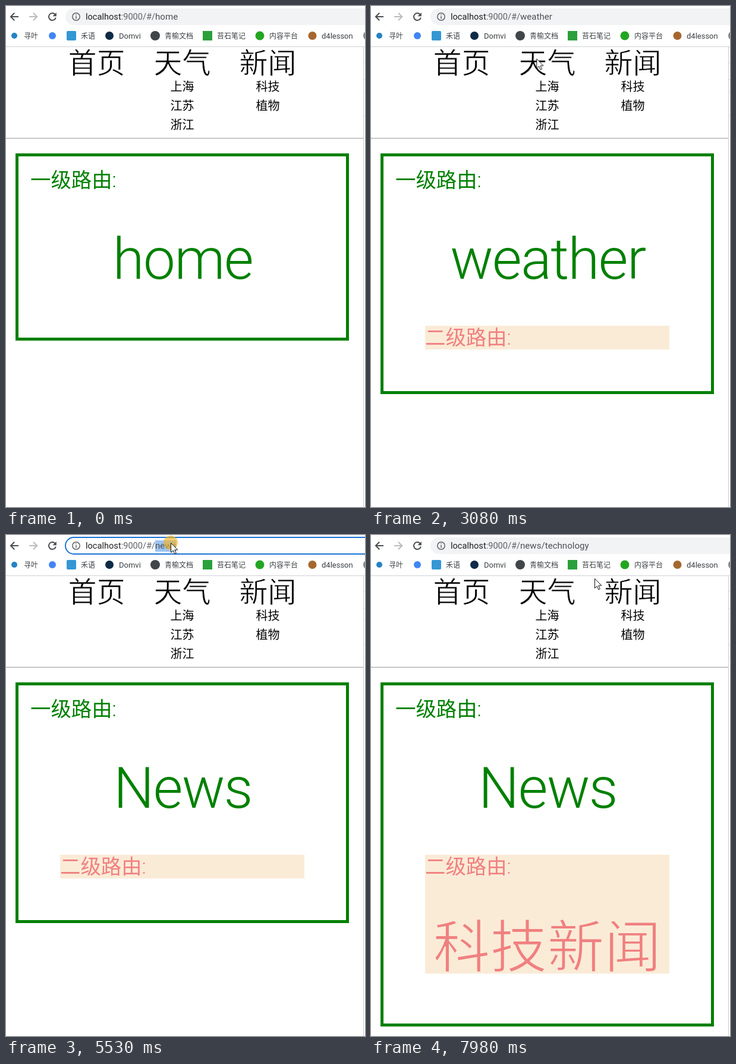
Animation, 604 px wide and 843 px high, one loop 8000 ms. Source, as an HTML page:

```html
<!DOCTYPE html>
<html lang="zh-CN">
<head>
<meta charset="utf-8">
<title>Router demo</title>
<style>
  html, body { margin: 0; height: 100%; overflow: hidden; background: #fff; }
  svg { display: block; width: 100vw; height: 100vh; }
  text { font-family: Roboto, "Noto Sans CJK SC", "Noto Sans CJK", sans-serif; }
  .mid { text-anchor: middle; }
  /* a stroke in the backdrop colour thins the heavy CJK glyphs */
  .nav { font-size: 48px; stroke: #fff; stroke-width: .8px; }
  .sub { font-size: 20px; }
  .label { font-size: 34.4px; font-weight: 300; }
  .big { font-size: 96px; font-weight: 300; }
  .latinBig { letter-spacing: -1.5px; }
  .thin { stroke: #faebd7; stroke-width: 2px; }
  .green { fill: #008000; }
  .coral { fill: #f08080; }
  .mark { font-size: 12px; fill: #3c4043; }
  .latin { font-size: 13px; }
  .host { font-size: 14.6px; fill: #202124; }
  .grey { fill: #5f6368; }
  .path { font-size: 15.1px; fill: #4d5156; }
  .icon { fill: none; stroke: #4a4e52; stroke-width: 2; }
  .off { stroke: #b9bcbf; }

  .home, .weather, .news, .newsUrl, .tech, .second, .frame, .band,
  .focus, .pick, .press, .arrow, .beam {
    animation: 8s step-end infinite;
  }
  .home { animation-name: home; }
  .weather { animation-name: weather; }
  .news { animation-name: news; }
  .newsUrl { animation-name: newsUrl; }
  .tech { animation-name: tech; }
  .second { animation-name: second; }
  .frame { animation-name: frame; }
  .band { animation-name: band; }
  .focus { animation-name: focus; }
  .pick { animation-name: pick; }
  .press { animation-name: press; }
  .arrow { animation-name: arrow; }
  .beam { animation-name: beam; }
  .pointer { animation: move 8s linear infinite; }

  /* pages */
  @keyframes home { 0% { opacity: 1 } 33.5%, 100% { opacity: 0 } }
  @keyframes weather { 0% { opacity: 0 } 33.5% { opacity: 1 } 59.5%, 100% { opacity: 0 } }
  @keyframes news { 0% { opacity: 0 } 59.5%, 100% { opacity: 1 } }
  @keyframes newsUrl { 0% { opacity: 0 } 59.5% { opacity: 1 } 94.5%, 100% { opacity: 0 } }
  @keyframes tech { 0% { opacity: 0 } 94.5%, 100% { opacity: 1 } }
  @keyframes second { 0% { opacity: 0 } 33.5%, 100% { opacity: 1 } }
  @keyframes frame { 0% { height: 310px } 33.5% { height: 400px } 94.5%, 100% { height: 574px } }
  @keyframes band { 0% { height: 40px } 94.5%, 100% { height: 200px } }

  /* address bar */
  @keyframes focus {
    0% { opacity: 0 } 42.25% { opacity: 1 } 57.75% { opacity: 0 }
    65.375% { opacity: 1 } 91.625%, 100% { opacity: 0 }
  }
  @keyframes pick {
    0% { x: 134px; width: 0 }
    42.25% { x: 134px; width: 172px }
    44.5% { x: 251px; width: 55px }
    57.75% { x: 134px; width: 0 }
    65.375% { x: 134px; width: 152px }
    68.125% { x: 251px; width: 35px }
    91.625%, 100% { x: 134px; width: 0 }
  }

  /* pointer */
  @keyframes press {
    0% { opacity: 0 }
    15.125% { opacity: .66 } 19.625% { opacity: 0 }
    31.75% { opacity: .66 } 33.5% { opacity: 0 }
    42.25% { opacity: .66 } 43.25% { opacity: 0 }
    44.5% { opacity: .66 } 46.625% { opacity: 0 }
    57.75% { opacity: .66 } 59.5% { opacity: 0 }
    65.375% { opacity: .66 } 66.625% { opacity: 0 }
    68.125% { opacity: .66; fill: #f0b428 } 70.25% { opacity: 0 }
    91.625% { opacity: .66 } 94.5%, 100% { opacity: 0 }
  }
  @keyframes arrow {
    0% { opacity: 0 } 7% { opacity: 1 } 13% { opacity: 0 }
    22.875% { opacity: 1 } 28.5% { opacity: 0 }
    37.625% { opacity: 1 } 55.625% { opacity: 0 }
    60.625% { opacity: 1 } 89.875% { opacity: 0 }
    91.625% { opacity: 1 } 94.5% { opacity: 0 }
    98.125%, 100% { opacity: 1 }
  }
  @keyframes beam {
    0% { opacity: 0 } 13% { opacity: 1 } 22.875% { opacity: 0 }
    28.5% { opacity: 1 } 37.625% { opacity: 0 }
    55.625% { opacity: 1 } 60.625% { opacity: 0 }
    89.875% { opacity: 1 } 91.625% { opacity: 0 }
    94.5% { opacity: 1 } 98.125%, 100% { opacity: 0 }
  }
  @keyframes move {
    0%, 7% { transform: translate(549px, 194px); animation-timing-function: cubic-bezier(.39, .575, .565, 1) }
    13%, 22.875% { transform: translate(143px, 103px); animation-timing-function: cubic-bezier(.39, .575, .565, 1) }
    28.5%, 37.625% { transform: translate(279px, 96px); animation-timing-function: ease-in-out }
    41.75%, 49.875% { transform: translate(271px, 16px); animation-timing-function: ease-in }
    52% { transform: translate(352px, 104px) }
    53.3% { transform: translate(405px, 125px); animation-timing-function: ease-out }
    55.625%, 60.625% { transform: translate(447px, 83px); animation-timing-function: ease-in-out }
    64.75%, 70.25% { transform: translate(277px, 13px); animation-timing-function: ease-in }
    73% { transform: translate(346px, 110px) }
    75.8% { transform: translate(312px, 184px); animation-timing-function: ease-out }
    78.125%, 83.375% { transform: translate(297px, 130px); animation-timing-function: ease-in }
    86% { transform: translate(365px, 105px); animation-timing-function: ease-out }
    89.875%, 98.125% { transform: translate(446px, 132px) }
    99.75%, 100% { transform: translate(376px, 73px) }
  }
</style>
</head>
<body>
<svg viewBox="0 0 604 843">
  <!-- toolbar -->
  <g class="icon">
    <path d="M21 18H8.5M14.2 11.7L7.9 18l6.3 6.3"/>
    <path class="off" d="M39 18H51.5M46 11.7l6.3 6.3-6.3 6.3"/>
    <path d="M82.4 14A6 6 0 1 0 83.8 19.5"/>
  </g>
  <path d="M84.8 11v6.3h-6.3z" fill="#4a4e52"/>
  <rect x="100" y="4" width="540" height="28" rx="14" fill="#f1f3f4"/>
  <rect class="focus" x="100" y="4" width="540" height="28" rx="14" fill="#fff" stroke="#1a73d8" stroke-width="2"/>
  <rect class="pick" x="134" y="9" width="0" height="19" fill="#9cc4f4"/>
  <circle cx="118" cy="18" r="6.2" fill="none" stroke="#5f6368" stroke-width="1.5"/>
  <path d="M118 17v4.5M118 14v1.6" stroke="#5f6368" stroke-width="1.5"/>
  <text class="host" x="134" y="23">localhost<tspan class="grey">:9000/#/</tspan></text>
  <g class="path">
    <text class="home" x="251" y="23">home</text>
    <text class="weather" x="251" y="23">weather</text>
    <text class="newsUrl" x="251" y="23">news</text>
    <text class="tech" x="251" y="23">news/technology</text>
  </g>

  <!-- bookmarks -->
  <circle cx="14" cy="50" r="5" fill="#2383c4"/>
  <circle cx="78" cy="50" r="6" fill="#4285f4"/>
  <rect x="102" y="42" width="16" height="16" rx="2" fill="#3597d3"/>
  <circle cx="174" cy="50" r="7" fill="#0f2b46"/>
  <circle cx="251" cy="50" r="8" fill="#41464b"/>
  <rect x="331" y="42" width="16" height="16" fill="#2ba03c"/>
  <circle cx="427" cy="50" r="7.5" fill="#22a622"/>
  <circle cx="515.5" cy="50" r="7" fill="#a5672f"/>
  <circle cx="609" cy="50" r="8" fill="#85878a"/>
  <g class="mark">
    <text x="30" y="55">寻叶</text>
    <text x="126" y="55">禾语</text>
    <text class="latin" x="190" y="55">Domvi</text>
    <text x="267" y="55">青榆文档</text>
    <text x="355" y="55">苔石笔记</text>
    <text x="443" y="55">内容平台</text>
    <text class="latin" x="531" y="55">d4lesson</text>
  </g>
  <path d="M0 68.5H604" stroke="#d0d2d5"/>
  <path d="M601.5 69V843" stroke="#cbcbcb"/>
  <path d="M602 95.5h2M602 123.5h2M602 184.5h2" stroke="#ddd"/>
  <path d="M602 143.5h2M602 205.5h2" stroke="#f3ecc4"/>

  <!-- menu -->
  <g class="nav mid">
    <text x="152.5" y="113">首页</text>
    <text x="296.5" y="113">天气</text>
    <text x="440.5" y="113">新闻</text>
  </g>
  <g class="sub mid">
    <text x="296.5" y="143">上海</text>
    <text x="296.5" y="175">江苏</text>
    <text x="296.5" y="207">浙江</text>
    <text x="440.5" y="143">科技</text>
    <text x="440.5" y="175">植物</text>
  </g>
  <path d="M0 222.5H601" stroke="#9a9a9a"/>

  <!-- page -->
  <rect class="frame" x="18.5" y="250.5" width="556" height="310" fill="none" stroke="#008000" stroke-width="5"/>
  <text class="label green" x="41" y="305">一级路由:</text>
  <g class="big latinBig green mid">
    <text class="home" x="297.5" y="459">home</text>
    <text class="weather" x="297.5" y="459">weather</text>
    <text class="news" x="297.5" y="459">News</text>
  </g>
  <g class="second">
    <rect class="band" x="91" y="538" width="411" height="40" fill="#faebd7"/>
    <text class="label coral" x="91" y="570">二级路由:</text>
  </g>
  <text class="tech big thin coral mid" x="296.5" y="726.5">科技新闻</text>

  <g class="pointer">
    <circle class="press" r="12" fill="#fff32e"/>
    <path class="arrow" d="M.5.5V16.5L4.3 13L6.8 18.8L9.3 17.7L6.8 12H11.8Z" fill="#fff" stroke="#111"/>
    <path class="beam" d="M-3.5-8H-1L0-7L1-8H3.5M0-7V7M-3.5 8H-1L0 7L1 8H3.5" fill="none" stroke="#222"/>
  </g>
</svg>
</body>
</html>
```
